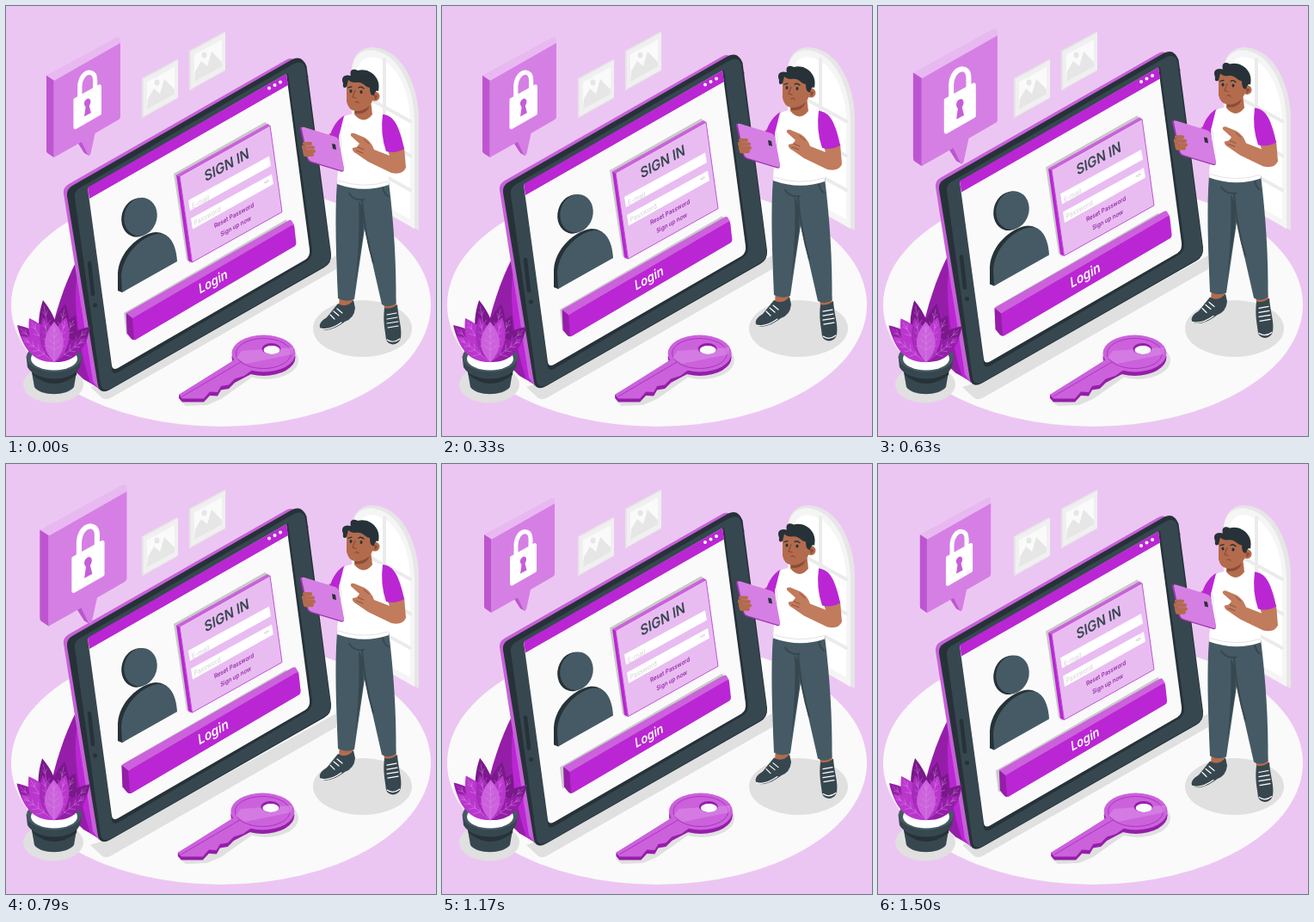
Recreate the animation shown at these times as an HTML page. Size 500x500 px, loop 1540 ms.

```html
<!DOCTYPE html>
<html lang="en">
<head>
<meta charset="utf-8">
<title>Sign in</title>
<style>
html, body { margin: 0; width: 100%; height: 100%; overflow: hidden; background: #ecc6f2 }
svg { display: block; width: 100vw; height: 100vh }
text { font-family: Inter, sans-serif; text-anchor: middle }
.line { fill: none; stroke-linecap: round; stroke-linejoin: round }
</style>
</head>
<body>
<svg viewBox="0 0 500 500">
  <g id="window">
    <path fill="#e6e6e6" d="M402 219V76C402 49 424 41 446 54C469 68 480 103 480 132V261Z"/>
    <path fill="#f5f5f5" d="M402 217V78C402 52 422 45 442 57C464 70 475 105 475 134V259Z"/>
    <path fill="#fff" d="M408 214V82C408 60 422 54 440 64C459 75 470 106 470 134V248Z"/>
    <path class="line" stroke="#ebebeb" stroke-width="4" d="M440 62V232M408 100L470 134M408 140L470 174M408 180L470 214"/>
  </g>
  <g id="picture">
    <path fill="#e6e6e6" d="M158 84L200 61.500V107L158 130.500Z"/>
    <path fill="#f0f0f0" d="M160 85L200 63V106L160 128Z"/>
    <path fill="#fafafa" d="M164 88.500L196 71V102.500L164 120Z"/>
    <path fill="#e6e6e6" d="M164 120L165 108L172 96L179 102L184 85L196 97V102.500Z"/>
    <ellipse cx="175.500" cy="89" rx="3" ry="3.600" fill="#e6e6e6"/>
  </g>
  <use href="#picture" x="55" y="-32"/>

  <ellipse cx="250" cy="347.500" rx="244" ry="141.500" fill="#fafafa"/>
  <g fill="#e0e0e0">
    <path d="M98 443L112 456Q117 459 123 455L384 306V290L120 436Z"/>
    <ellipse cx="414.500" cy="375" rx="57.500" ry="33"/>
    <ellipse cx="55" cy="440" rx="35" ry="21.500"/>
  </g>

  <g class="float" id="tablet">
    <path fill="#951ea9" d="M82 296C68 324 56 358 50 395L90 434L106 443Z"/>
    <path fill="#ba26d3" d="M82 318C78 350 86 405 98 438L108 445L95 315Z"/>
    <path fill="#c760d9" d="M67 218Q66 211 73 207L326 62.500Q333 59 338 64L352 82L108 446L101 436Z"/>
    <path fill="#263238" d="M71 221Q70 213 77 209L332 62.500Q344 56 349.500 70L378 288Q379 299 370 304L121 446Q110 452 107 442Z"/>
    <path fill="#37474f" d="M80 223Q79 216 85 212L334 67.500Q345 62 348 72L377 286Q379 297 371 302L123 444Q112 450 110 440Z"/>
    <path fill="#263238" d="M95 212L328 78L356 283Q357 292 350 297L130 426Q124 429 123 423Z"/>
    <path fill="#fafafa" d="M95 212L326 79L353 283Q354 291 348 295L130 421Q124 424 123 418Z"/>
    <path fill="#ba26d3" d="M95 211L326 79L328 92L97 224Z"/>
    <g fill="#fff"><circle cx="306" cy="95.500" r="2"/><circle cx="312.500" cy="92" r="2"/><circle cx="319" cy="88.500" r="2"/></g>
    <path class="line" stroke="#263238" stroke-width="4.500" d="M97 299L101 335"/>
    <circle cx="103.500" cy="348" r="2.500" fill="#263238"/>

    <g id="avatar">
      <ellipse cx="153.500" cy="246" rx="19" ry="23" fill="#263238" transform="rotate(16 154 246)"/>
      <ellipse cx="156.500" cy="245" rx="19" ry="22.500" fill="#455a64" transform="rotate(16 156 245)"/>
      <path fill="#263238" d="M130 331V311C131 286 155 265 174 263C188 263 196 275 198 292L135 333Z"/>
      <path fill="#455a64" d="M135 333L134 314C135 291 156 268 176 265C191 263 198 279 199 297Z"/>
    </g>

    <path fill="#c9c9c9" d="M195 195L301 135L307 139L214 299L210 295Z"/>
    <path fill="#ba26d3" d="M198 196.500L202 198L216.500 298.500L212 296Z"/>
    <path fill="#cb62dc" d="M198 196.500L304 137L307 139L202 198Z"/>
    <path fill="#e8bcf1" stroke="#c253d6" d="M202 198L307 139L321 239.500L216.500 298Z"/>
    <g fill="#fff"><path d="M212 226L306 174.500L308 186L214 238Z"/><path d="M215 247L309 195.500L311 207L217 259.500Z"/></g>
    <path class="line" stroke="#d5d5d5" d="M300.500 205.500Q302.500 202 305.500 203Q304 206.500 300.500 205.500"/>
    <text transform="matrix(.84 -.46 .15 1 257.500 190.500)" font-size="16.500" font-weight="600" fill="#37474f">SIGN IN</text>
    <g fill="#d2d2d2" font-size="8">
      <text transform="matrix(.84 -.46 .15 1 226.500 230.500)">E-mail</text>
      <text transform="matrix(.84 -.46 .15 1 234.500 247)">Password</text>
    </g>
    <g fill="#8d1ca0" font-size="7.200" font-weight="500">
      <text transform="matrix(.84 -.46 .15 1 265.500 246)">Reset Password</text>
      <text transform="matrix(.84 -.46 .15 1 267.500 258.500)">Sign up now</text>
    </g>

    <path fill="#cacaca" d="M137 357L326 248L330 266L140 382Z"/>
    <g id="login">
      <path fill="#951ea9" d="M141 356.500L150 361L151 387Q149 388 147 386L142 380Z"/>
      <path fill="#cb62dc" d="M141 356.500L327 250.500Q330 249 331 251L334 256L149 363Z"/>
      <path fill="#ba26d3" d="M148.500 364Q149 362 151 361L331 256Q334 255 334 258L336 276Q336 279 334 280L152 387Q150 388 150 385Z"/>
      <text transform="matrix(.84 -.48 .14 1.050 241.500 325.500)" font-size="14.500" font-weight="600" fill="#fff">Login</text>
    </g>
  </g>

  <g id="bubble">
    <path fill="#e8b9f0" d="M49 82L127 39.500Q131 38 131 43V47L57 89Z"/>
    <path fill="#bd55d0" d="M49 82L57.500 87.500V173L50 168Q49 167 49 165ZM84 157L91 168L96.500 171V150Z"/>
    <path fill="#d57fe4" d="M57 88L131 46V128Q131 130 129 131L103 146L98 169Q97 171 95 170L88 155.500L57 173Z"/>
    <path class="line" stroke="#fff" stroke-width="5" d="M86 106V94C86.500 85 91 79 96.500 78.500Q103 79 103 87V97"/>
    <path fill="#fff" stroke="#fff" stroke-width="4" stroke-linejoin="round" d="M81 109L108 94V124L81 139.500Z"/>
    <path fill="#c65dd8" d="M92.500 117C89 113 92 108 95.500 107.500C99 108 98.500 113 96.500 115.500L98.500 123.500L91 127.500Z"/>
  </g>

  <g id="key">
    <g id="keyShadow" fill="#e0e0e0" transform="translate(2 7)">
      <ellipse cx="300" cy="405" rx="38" ry="22"/>
      <path d="M264 410L200 452L207 458L232 457L248 450L285 424Z"/>
    </g>
    <g fill="#951ea9">
      <ellipse cx="299.500" cy="408.500" rx="37" ry="21.500"/>
      <path d="M266 412L201 452V456L205 460.500H230L237 453L246 453.500L250 446.500L259 445L266 438L285 428Z"/>
    </g>
    <g fill="#cb62dc">
      <ellipse cx="299.500" cy="404" rx="37" ry="21.500"/>
      <path d="M266 411L201 452L205 456.500H230L237 448.500L246 449L250 442L259 440.500L266 433.500L277 430L288 422Z"/>
    </g>
    <g class="line" stroke="#ab35bf">
      <ellipse cx="299.500" cy="404" rx="32" ry="17.500"/>
      <path d="M273 414L205 454"/>
    </g>
    <path fill="#d98ce6" d="M268 409L274 401L334 397L333 405L279 416Z" opacity=".6"/>
    <ellipse cx="308.500" cy="398.500" rx="11" ry="6.500" fill="#951ea9"/>
    <ellipse cx="309" cy="400" rx="9.500" ry="5" fill="#fafafa"/>
  </g>

  <g id="plant">
    <path fill="#37474f" d="M29 420L33 443C40 454 71 454 79 443L83 420Z"/>
    <path fill="#263238" d="M29 420Q56 445 83 420L82 429Q56 449 31 429Z"/>
    <path fill="#37474f" d="M23.500 407L25 420C36 438 76 438 86 420L88 407Z"/>
    <ellipse cx="56" cy="408" rx="32" ry="17.500" fill="#455a64"/>
    <ellipse cx="56" cy="410" rx="27" ry="13.500" fill="#fff"/>
    <g id="leaves"></g>
  </g>

  <g class="float" id="person">
    <g id="legs">
      <path fill="#b36b4d" d="M388 335H404L403 349H387ZM438 338H453L454 352H440Z"/>
      <path fill="#37474f" d="M386 346Q396 352 404 342L406 351Q405 363 394 367C384 375 370 380 365 374Q363 368 373 362ZM440 351Q448 353 455 347C456 363 461 375 459 386C457 395 445 396 442 388C441 377 438 368 440 351Z"/>
      <path class="line" stroke="#fff" stroke-width="1.200" d="M377 359l5 5M381 355l6 5M385 352l6 5M443 359l11-2M443 364l12-2M443 369l13-2M444 374l12-2M366 375q10 3 24-7M443 388q7 5 15-1"/>
      <path fill="#455a64" d="M385 204H445C451 252 454 300 453.500 346Q445 352 437 347L417 259L405 341Q395 345 386 340C384 290 382 245 385 204Z"/>
      <path class="line" stroke="#37474f" stroke-width="2" d="M399 218Q405 227 416 225M414 226Q417 264 427 298M438 211Q440 219 444 221"/>
      <path fill="#37474f" d="M410 227Q417 233 415 267L406 323Q412 268 410 227Z"/>
    </g>
    <path fill="#b36b4d" d="M376 148L390 154L388 177L362 181L346 174L344 162L372 164Z"/>
    <path fill="#ba26d3" d="M394 127C386 131 380 140 376 152Q382 158 389 156Z"/>
    <path fill="#fff" d="M393 128Q414 121 438 126Q448 142 444 165L445 208Q416 218 385 207C386 185 389 170 387 152Z"/>
    <path class="line" stroke="#e3e3e3" d="M386 203Q416 213 444 204M388 150Q391 157 389 168"/>
    <path fill="#b36b4d" d="M405 115L424 109L426 126Q416 139 405 126Z"/>
    <path fill="#8b4c36" d="M406 120Q415 122 423 116Q419 127 406 125Z"/>

    <g id="head">
      <circle cx="429" cy="105" r="5.500" fill="#b36b4d"/>
      <path fill="#b36b4d" d="M396 88C396 80 425 80 427 91V108C424 118 414 123 406 122Q398 121 396 111Z"/>
      <path fill="#263238" d="M392 90C389 83 393 79 401 81C399 74 404 72 409 75C422 71 437 83 433 99Q430 97 428 104Q423 105 423 95C417 94 415 87 406 89Q401 89 398 86L396 94Q391 97 392 90Z"/>
      <path fill="#8b4c36" d="M428 104q3-2 4 1-1 3-3 4Z"/>
      <path class="line" stroke="#263238" stroke-width="1.300" d="M398 95l4-1M410 95q3-2 6 1"/>
      <ellipse cx="401" cy="99" rx="1.500" ry="2" fill="#263238"/>
      <ellipse cx="413" cy="100" rx="1.500" ry="2" fill="#263238"/>
      <path class="line" stroke="#8b4c36" stroke-width="1.200" d="M406 98L403 106L407 107M406 112q3-2 4 1"/>
    </g>

    <path fill="#9b35ad" d="M342 143Q341 140 345 141L384 153L393 191Q392 194 388 192L355 182Q351 181 350 177Z"/>
    <path fill="#d57fe4" d="M344 143Q343 140 347 141L383 152Q386 153 387 156L393 188Q394 193 389 191L356 181Q352 180 351 176Z"/>
    <path fill="#263238" d="M379 160L383 161L384 167L380 166Z"/>
    <path class="line" stroke="#b36b4d" stroke-width="4.200" d="M347 160h7M346 164.500h11M347 169h11M348 173h8"/>

    <path fill="#c17b5d" d="M443 165L463 164L465 188Q461 197 448 194L421 181L408 172Q402 169 403 165L408 164L411 160L401 151Q400 147 405 148L417 153Q425 158 428 167L446 174Z"/>
    <path class="line" stroke="#8b4c36" stroke-width=".900" d="M409 164l7 3M407 168l8 3M416 155l6 5"/>
    <path fill="#ba26d3" d="M438 126C451 127 457 139 463 166Q453 172 442 169Q435 149 438 126Z"/>
  </g>
</svg>
<script>
const LOOP = 1540, HALF_BEAT = 224;
const byId = id => document.getElementById(id);
const floaters = document.querySelectorAll('.float');

// tip x, tip y, half width, fill; ordered back to front
const leafSpecs = [
  [43, 342, 12, '#7b188c'], [69, 346, 12, '#7b188c'], [13, 371, 12, '#951ea9'], [98, 373, 12, '#7b188c'],
  [27, 363, 13, '#ba36cd'], [81, 360, 13, '#7b188c'], [17, 384, 10, '#ba36cd'], [95, 385, 10, '#951ea9'],
  [43, 362, 11, '#a62abb'], [70, 362, 11, '#ba36cd'], [56, 367, 12, '#cb62dc']
];
byId('leaves').innerHTML = leafSpecs.map(([x, y, w, fill]) => {
  const dx = x - 56, dy = y - 414, length = Math.hypot(dx, dy);
  const angle = Math.atan2(dx, -dy) * 180 / Math.PI;
  const veins = [.3, .45, .6, .75].map(f => {
    const v = length * f, s = w * (1 - f) * .9;
    return `M${-s} ${-v - 5}L0 ${-v}L${s} ${-v - 5}`;
  }).join('');
  return `<g transform="translate(56 414) rotate(${angle})">
    <path fill="${fill}" d="M0 0C${-w * 1.4} ${-length * .35} ${-w} ${-length * .7} 0 ${-length}C${w} ${-length * .7} ${w * 1.4} ${-length * .35} 0 0"/>
    <path class="line" stroke="#e3a0ed" stroke-width=".6" opacity=".6" d="M0 0V${-length * .9}${veins}"/></g>`;
}).join('');

const beat = (t, peak) => {
  const d = Math.abs((t - peak + LOOP * 1.5) % LOOP - LOOP / 2);
  return d < HALF_BEAT ? (1 + Math.cos(Math.PI * d / HALF_BEAT)) / 2 : 0;
};

const swayPoints = [[0, 0], [210, .6], [500, -.5], [740, -1.5], [1170, 1.4], [LOOP, 0]];
function sway(t) {
  const i = swayPoints.findIndex(p => p[0] > t);
  const [t0, a] = swayPoints[i - 1], [t1, b] = swayPoints[i];
  return a + (b - a) * (t - t0) / (t1 - t0);
}

const scaleAbout = (s, x, y) => `translate(${x} ${y}) scale(${s}) translate(${-x} ${-y})`;

function draw(now) {
  const t = now % LOOP;
  const lift = 9.2 * (1 - Math.abs(1 - 2 * t / LOOP));
  const pulse = beat(t, 166) + beat(t, 721);
  const shift = sway(t);
  floaters.forEach(g => g.setAttribute('transform', `translate(0 ${-lift})`));
  byId('bubble').setAttribute('transform', scaleAbout(1 + .3 * pulse, 90.5, 105.5));
  byId('login').setAttribute('transform', scaleAbout(1 + .088 * pulse, 238.5, 319));
  byId('key').setAttribute('transform', `translate(${shift} 0)`);
  byId('keyShadow').setAttribute('transform', `translate(${2 - shift} 7)`);
  byId('leaves').setAttribute('transform', `rotate(${shift * .6} 56 414)`);
}

(function frame() {
  draw(performance.now());
  requestAnimationFrame(frame);
})();
</script>
</body>
</html>
```
